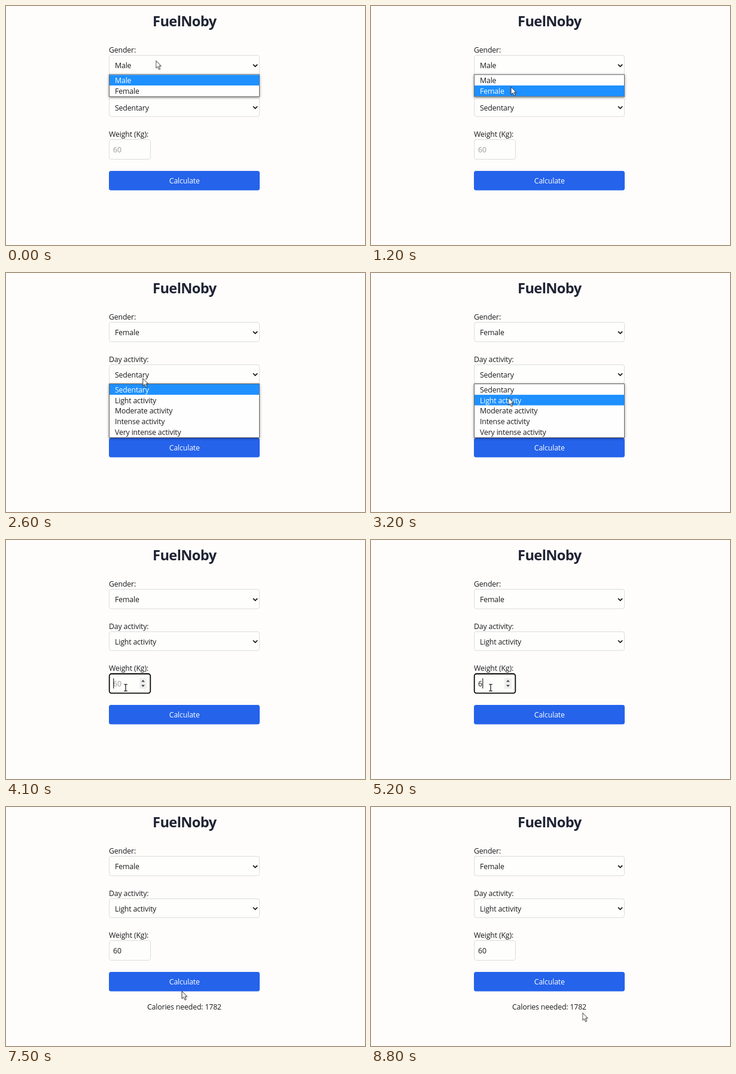
Animation of 600 by 400 pixels, one loop 9 s. Source, as an HTML page:

```html
<!DOCTYPE html>
<html lang="en">
<head>
<meta charset="utf-8">
<title>FuelNoby</title>
<style>
  html, body { margin: 0; width: 100%; height: 100%; overflow: hidden; background: #fefdfc; }
  svg { display: block; width: 600px; height: 400px; }
  text { font: 12.3px "Open Sans", "Noto Sans", sans-serif; letter-spacing: -.15px; fill: #1b1b1d; white-space: pre; }
  .title { font-size: 23.6px; font-weight: 700; letter-spacing: -.6px; fill: #1f2433; }
  .mid { text-anchor: middle; }
  .light, .light text { fill: #fff; }
  .hint { fill: #9b9b9b; }
  .box { fill: #fefefd; stroke: #dcdcdc; }
  .ring { fill: none; stroke: #0c0c0c; stroke-width: 1.8; }
  .arrow { fill: none; stroke: #111; stroke-width: 1.7; }
  .menu { filter: drop-shadow(0 1px 2px rgba(0, 0, 0, .4)); }
  .panel { fill: #fefefe; stroke: #666; }
  .pick { fill: #1e90ff; }
  .caret { stroke: #111; stroke-width: 1.1; }
  .button { fill: #2563eb; }
  .pointer { fill: #fff; stroke: #1a1a1a; stroke-width: .95; stroke-linejoin: round; }
  .ibeam { fill: none; stroke: #111; stroke-width: 1.2; }

  /* on/off windows */
  .t { animation: 9s step-end infinite; }
  @keyframes genderMenu { 0% { opacity: 1 } 15.55%, 100% { opacity: 0 } }
  @keyframes genderSet { 0% { opacity: 0 } 15.55%, 100% { opacity: 1 } }
  @keyframes genderFocus { 0% { opacity: 0 } 15.55% { opacity: 1 } 24.44%, 100% { opacity: 0 } }
  @keyframes malePick { 0% { opacity: 1 } 12.22%, 100% { opacity: 0 } }
  @keyframes femalePick { 0% { opacity: 0 } 12.22%, 100% { opacity: 1 } }
  @keyframes dayMenu { 0% { opacity: 0 } 24.44% { opacity: 1 } 38.88%, 100% { opacity: 0 } }
  @keyframes dayUnset { 0% { opacity: 1 } 38.88%, 100% { opacity: 0 } }
  @keyframes daySet { 0% { opacity: 0 } 38.88%, 100% { opacity: 1 } }
  @keyframes dayFocus { 0% { opacity: 0 } 38.88% { opacity: 1 } 45.55%, 100% { opacity: 0 } }
  @keyframes stillPick { 0% { opacity: 1 } 34.44%, 100% { opacity: 0 } }
  @keyframes lightPick { 0% { opacity: 0 } 34.44%, 100% { opacity: 1 } }
  @keyframes spinner { 0% { opacity: 0 } 41.11% { opacity: 1 } 77.77%, 100% { opacity: 0 } }
  @keyframes weightFocus { 0% { opacity: 0 } 45.55% { opacity: 1 } 77.77%, 100% { opacity: 0 } }
  @keyframes hint { 0% { opacity: 1 } 57.77%, 100% { opacity: 0 } }
  @keyframes digit1 { 0% { opacity: 0 } 57.77% { opacity: 1 } 61.11%, 100% { opacity: 0 } }
  @keyframes digit2 { 0% { opacity: 0 } 61.11%, 100% { opacity: 1 } }
  @keyframes caret {
    0% { opacity: 0; transform: none }
    45.55% { opacity: 1; transform: none }
    52.22% { opacity: 0; transform: none }
    57.77% { opacity: 1; transform: translate(7px, 0) }
    61.11% { opacity: 1; transform: translate(13.8px, 0) }
    66.66% { opacity: 0; transform: translate(13.8px, 0) }
    72.22% { opacity: 1; transform: translate(13.8px, 0) }
    77.77%, 100% { opacity: 0; transform: none }
  }
  @keyframes result { 0% { opacity: 0 } 77.77%, 100% { opacity: 1 } }

  /* cursor shapes */
  @keyframes asArrow {
    0% { opacity: 1 } 41.11% { opacity: 0 } 66.66% { opacity: 1 }
    68.88% { opacity: 0 } 83.33%, 100% { opacity: 1 }
  }
  @keyframes asBeam { 0% { opacity: 0 } 41.11% { opacity: 1 } 66.66%, 100% { opacity: 0 } }
  @keyframes asHand { 0% { opacity: 0 } 68.88% { opacity: 1 } 83.33%, 100% { opacity: 0 } }

  /* cursor path, ten steps a second */
  #cursor { animation: move 9s step-end infinite; }
  @keyframes move {
    0% { transform: translate(250.5px, 91.5px) }
    4.44% { transform: translate(250.5px, 91.5px); animation-timing-function: steps(4) }
    8.88% { transform: translate(241px, 116px); animation-timing-function: steps(3) }
    12.22% { transform: translate(234.5px, 133.5px) }
    13.33% { transform: translate(234px, 135.5px) }
    16.66% { transform: translate(234px, 135.5px); animation-timing-function: steps(5) }
    22.22% { transform: translate(228.5px, 165px) }
    27.77% { transform: translate(228.5px, 165px); animation-timing-function: steps(3) }
    31.11% { transform: translate(229px, 199px) }
    32.22% { transform: translate(229px, 199px); animation-timing-function: steps(3) }
    35.55% { transform: translate(229.5px, 208.5px) }
    37.77% { transform: translate(229.5px, 208.5px); animation-timing-function: steps(6) }
    44.44% { transform: translate(200px, 247px) }
    65.55% { transform: translate(200px, 247px); animation-timing-function: steps(4) }
    69.99% { transform: translate(255px, 302.5px); animation-timing-function: steps(3) }
    73.33% { transform: translate(281px, 297px) }
    82.22% { transform: translate(281px, 297px); animation-timing-function: steps(5) }
    87.77% { transform: translate(346px, 353px) }
    88.88%, 100% { transform: translate(353.5px, 344.5px) }
  }
</style>
</head>
<body>
<svg viewBox="0 0 600 400">
  <text class="title mid" x="298.3" y="34">FuelNoby</text>

  <text x="172" y="78">Gender:</text>
  <rect class="box" x="172.5" y="82.5" width="251" height="32.5" rx="3.5"/>
  <path class="arrow" d="M413 97.8l3.6 3.6 3.6-3.6"/>
  <text class="t" style="animation-name:genderMenu" x="182" y="104">Male</text>
  <text class="t" style="animation-name:genderSet" x="182" y="104">Female</text>
  <rect class="ring t" style="animation-name:genderFocus" x="172.7" y="83" width="251" height="32" rx="3.5"/>

  <text x="172" y="149">Day activity:</text>
  <rect class="box" x="172.5" y="153.5" width="251" height="31.5" rx="3.5"/>
  <path class="arrow" d="M413 168l3.6 3.6 3.6-3.6"/>
  <text class="t" style="animation-name:dayUnset" x="182" y="174.7">Sedentary</text>
  <text class="t" style="animation-name:daySet" x="182" y="174.7">Light activity</text>
  <rect class="ring t" style="animation-name:dayFocus" x="172.7" y="153.5" width="251" height="32" rx="3.5"/>

  <text x="172" y="219">Weight (Kg):</text>
  <rect class="box" x="172.5" y="223.5" width="69" height="33" rx="3.5"/>
  <text class="hint t" style="animation-name:hint" x="179" y="245">60</text>
  <text class="t" style="animation-name:digit1" x="179" y="245">6</text>
  <text class="t" style="animation-name:digit2" x="179" y="245">60</text>
  <g class="t" style="animation-name:spinner">
    <rect x="223" y="231" width="12" height="18" fill="#efefef"/>
    <path d="M226 237.5l3-3.4 3 3.4zM226 242.5l3 3.4 3-3.4z" fill="#484848"/>
  </g>
  <rect class="ring t" style="animation-name:weightFocus" x="172.7" y="224" width="68.6" height="32.3" rx="3.5"/>
  <path class="caret t" style="animation-name:caret" d="M179.8 231.5v17"/>

  <rect class="button" x="172" y="276" width="252" height="32.5" rx="3.5"/>
  <text class="light mid" x="298.3" y="297">Calculate</text>
  <text class="mid t" style="animation-name:result" x="298" y="339">Calories needed: 1782</text>

  <g class="t" style="animation-name:genderMenu">
    <g class="menu"><rect class="panel" x="172.5" y="114.8" width="251" height="36.9"/></g>
    <text x="182" y="129.3">Male</text>
    <text x="182" y="147">Female</text>
    <g class="light t" style="animation-name:malePick">
      <rect class="pick" x="173" y="115.4" width="250.5" height="17.6"/>
      <text x="182" y="129.3">Male</text>
    </g>
    <g class="light t" style="animation-name:femalePick">
      <rect class="pick" x="173" y="133" width="250.5" height="18"/>
      <text x="182" y="147">Female</text>
    </g>
  </g>

  <g class="t" style="animation-name:dayMenu">
    <g class="menu"><rect class="panel" x="172.5" y="185.5" width="251" height="90"/></g>
    <text x="182" y="200">Sedentary</text>
    <text x="182" y="217.7">Light activity</text>
    <text x="182" y="235.4">Moderate activity</text>
    <text x="182" y="253">Intense activity</text>
    <text x="182" y="270.7">Very intense activity</text>
    <g class="light t" style="animation-name:stillPick">
      <rect class="pick" x="173" y="186" width="250.5" height="17.8"/>
      <text x="182" y="200">Sedentary</text>
    </g>
    <g class="light t" style="animation-name:lightPick">
      <rect class="pick" x="173" y="203.8" width="250.5" height="17.7"/>
      <text x="182" y="217.7">Light activity</text>
    </g>
  </g>

  <g id="cursor">
    <path class="pointer t" style="animation-name:asArrow" d="M0 0V12.6L2.9 9.9 5.1 14.8 7.2 13.8 5.1 9.1H8.9Z"/>
    <path class="ibeam t" style="animation-name:asBeam" d="M-2.8-5.5h2.2l.6.6.6-.6h2.2M0-5V5M-2.8 5.6h2.2l.6-.6.6.6h2.2"/>
    <g class="pointer t" style="animation-name:asHand">
      <path d="M-1.6 11V1.2C-1.6-.4 1-.4 1 1.2V6.6C1.5 5.8 3.2 6 3.4 7.2 4 6.6 5.3 6.8 5.5 8 6.3 7.6 7 8.2 7 9.2V12.5C7 15 5.8 16 5.6 18.2H-1.2C-1.6 16-4.6 13-5 11.2-5.2 9.8-3.6 9.4-2.8 10.4Z"/>
      <path d="M1 6.6V10M3.4 7.2V10.2M5.5 8V10.6" fill="none"/>
    </g>
  </g>
</svg>
</body>
</html>
```
